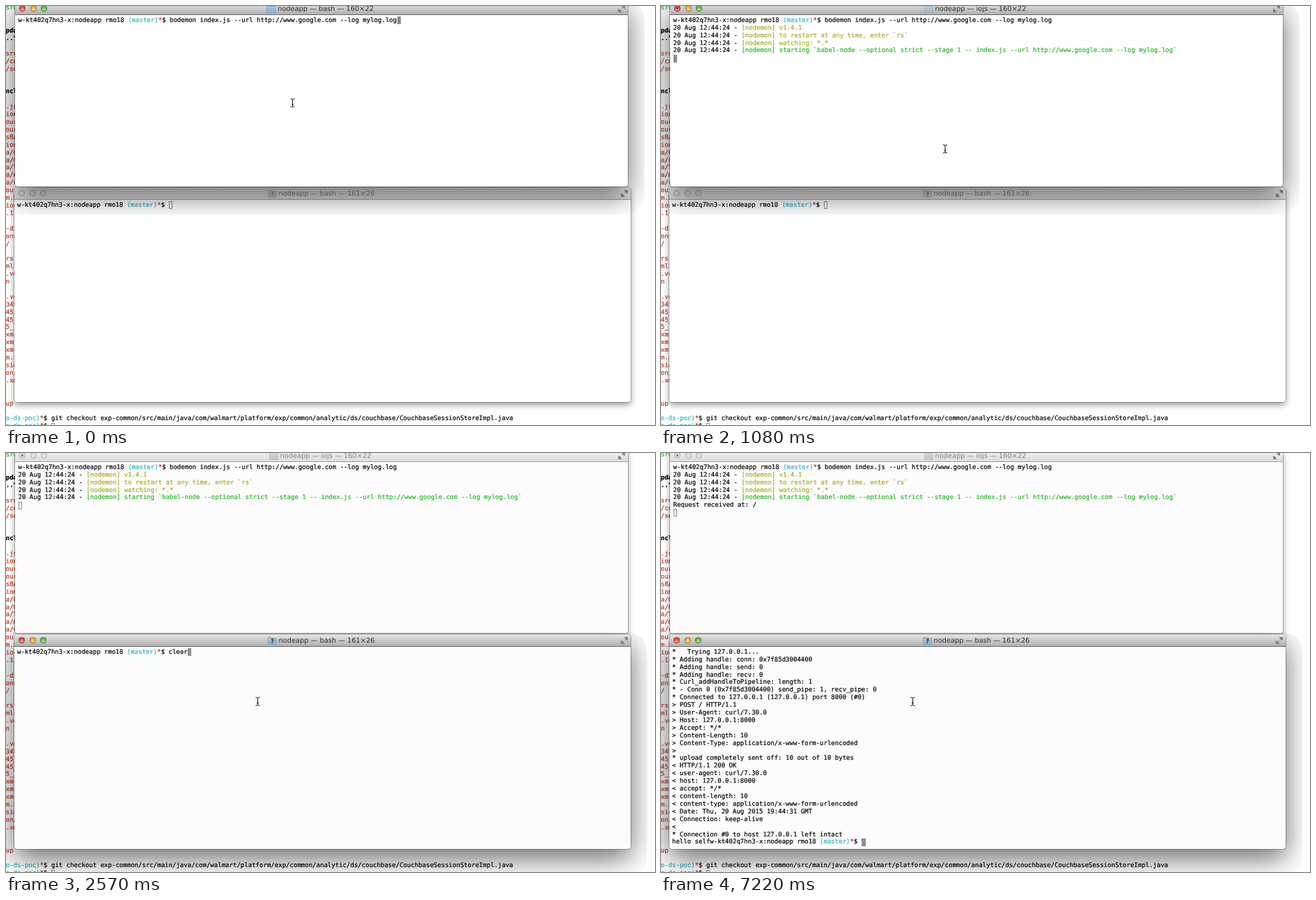
Animation of 932x601 px, one loop 8000 ms. Source, as an HTML page:

```html
<!DOCTYPE html>
<html lang="en">
<head>
<meta charset="utf-8">
<title>Two terminals</title>
<style>
  html, body { margin: 0; width: 100%; height: 100%; overflow: hidden; background: #fff; }
  #stage { position: absolute; width: 932px; height: 601px; overflow: hidden; text-rendering: geometricPrecision; }
  #stage > *, .bar, .lights i, .screen, .cursor, .expand { position: absolute; }
  pre {
    margin: 0; color: #000; white-space: pre;
    font: 9.04px/10.91px "DejaVu Sans Mono", monospace;
    -webkit-text-stroke: .2px currentColor;
  }
  pre b { font-weight: 400; }
  pre strong { font-weight: 700; }
  .red { color: #c23621; } .green { color: #25b824; } .yellow { color: #a9a927; } .cyan { color: #2fb4c2; }

  .win { background: #fff; border-radius: 4px; box-shadow: 0 0 0 .6px rgba(0,0,0,.35), 0 4px 10px rgba(0,0,0,.42); }
  /* The wide shadow ends in a crisp edge instead of fading out. */
  .win.active {
    z-index: 1; box-shadow: 0 0 0 .6px rgba(0,0,0,.45), 0 13px 40px rgba(0,0,0,.6);
    clip-path: inset(-3px -24px -40px -24px round 28px);
  }
  .tinted .win { background: #fcfcfc; }
  #top { left: 13px; top: -5px; width: 880px; height: 264px; }
  #bottom { left: 12px; top: 260px; width: 885px; height: 308px; }
  .bar {
    left: 0; top: 0; width: 100%; height: 18px; box-sizing: border-box;
    border-radius: 4px 4px 0 0; border-bottom: 1px solid #a0a0a0;
    background: linear-gradient(#f4f4f4, #dcdcdc); color: #808080;
  }
  .active .bar { background: linear-gradient(#e6e6e6, #b0b0b0); border-color: #6a6a6a; color: #2c2c2c; }
  .title {
    position: relative; left: -2px; top: .8px; height: 17px; display: flex; justify-content: center; align-items: center;
    gap: 3px; font: 9.8px/17px "DejaVu Sans", sans-serif; white-space: pre;
  }
  .title svg { opacity: .5; filter: grayscale(.5); }
  .active .title svg { opacity: 1; filter: none; }
  .busy .title svg { opacity: .55; }
  .lights i {
    top: 4px; width: 9px; height: 9px; box-sizing: border-box; border-radius: 50%;
    border: 1px solid #a4a4a4; background: #e2e2e2;
  }
  .active .lights i { border-color: rgba(0,0,0,.4); background: radial-gradient(circle at 50% 75%, #fff9, #fff0 60%) var(--c); }
  .busy .lights i:first-child::after {
    content: ""; position: absolute; left: 2px; top: 2px; width: 3px; height: 3px; border-radius: 50%; background: #0008;
  }
  .expand { right: 4px; top: 4px; fill: #777; stroke: #777; }
  .screen { top: 20.8px; }
  .cursor { width: 5.4px; height: 11px; margin-top: -.8px; box-sizing: border-box; border: 1px solid #8c8c8c; }
  .active .cursor { background: #8c8c8c; }
  #mouse { left: 0; top: 0; z-index: 2; }
</style>
</head>
<body>
<div id="stage"></div>
<script>
const CELL = 5.443, ROW = 10.91, LOOP = 8000;
const stage = document.getElementById('stage');
const esc = s => s.replace(/&/g, '&amp;').replace(/</g, '&lt;').replace(/>/g, '&gt;');
const paint = (color, s) => `<b class="${color}">${esc(s)}</b>`;
const cursorAt = (col, row) => `<div class="cursor" style="left:${col * CELL}px;top:${row * ROW}px"></div>`;

const HOST = 'w-kt402q7hn3-x:nodeapp rmo18 ';
const PROMPT = HOST + paint('cyan', '(master)') + paint('red', '*') + '$ ';
const PROMPT_COLS = 40;

// Terminal behind the two windows; only its left edge and last lines show.
const edge = ['src', '', '', 'pda', '.."', '', 'src', '/co', '/se', '', '', 'ncl', '',
  '.js', 'ion', 'our', 'our', 'sBa', 'ion', 'a/C', 'a/C', 'a/T', 'a/m', 'a/v', 'our', 'm.x', 'ion', '.11', '',
  '-di', 'ons', '/', '', 'rs', 'ml', '.ve', 'n', '', '.ve', '345', '45_', '45_', '5_', 'xm', 'xm', 'xm',
  'm.x', 'sio', 'on/', '.xm', '', '', 'up', ''];
const edgeLine = (s, i) => i === 0 ? paint('green', s)
  : [3, 4, 11].includes(i) ? `<strong>${s}</strong>` : paint('red', s);
const poc = paint('cyan', 'o-ds-poc)') + paint('red', '*') + '$ ';
const backdrop = [...edge.map(edgeLine),
  poc + 'git checkout exp-common/src/main/java/com/walmart/platform/exp/common/analytic/ds/couchbase/CouchbaseSessionStoreImpl.java',
  poc].join('\n') + cursorAt(12, 55);

// Text of the upper window.
const stamp = '20 Aug 12:44:24 - ';
const command = 'bodemon index.js --url http://www.google.com --log mylog.log';
const launch = PROMPT + command;
const log = [launch,
  ...['v1.4.1', 'to restart at any time, enter `rs`', 'watching: *.*'].map(s => stamp + paint('yellow', '[nodemon] ' + s)),
  stamp + paint('green', '[nodemon] starting `babel-node --optional strict --stage 1 -- index.js --url http://www.google.com --log mylog.log`')
].join('\n');

// Text of the lower window.
const typed = s => PROMPT + esc(s) + cursorAt(PROMPT_COLS + s.length, 0);
const response = esc(`*   Trying 127.0.0.1...
* Adding handle: conn: 0x7f85d3004400
* Adding handle: send: 0
* Adding handle: recv: 0
* Curl_addHandleToPipeline: length: 1
* - Conn 0 (0x7f85d3004400) send_pipe: 1, recv_pipe: 0
* Connected to 127.0.0.1 (127.0.0.1) port 8000 (#0)
> POST / HTTP/1.1
> User-Agent: curl/7.30.0
> Host: 127.0.0.1:8000
> Accept: */*
> Content-Length: 10
> Content-Type: application/x-www-form-urlencoded
>
* upload completely sent off: 10 out of 10 bytes
< HTTP/1.1 200 OK
< user-agent: curl/7.30.0
< host: 127.0.0.1:8000
< accept: */*
< content-length: 10
< content-type: application/x-www-form-urlencoded
< Date: Thu, 20 Aug 2015 19:44:31 GMT
< Connection: keep-alive
<
* Connection #0 to host 127.0.0.1 left intact
hello self`) + PROMPT + cursorAt(PROMPT_COLS + 10, 25);

const folder = mark => `<svg width="13" height="11" viewBox="0 0 13 11">
  <path d="M.5 2.5V1.2Q.5.5 1.2.5H4.5L5.5 1.6H11.8Q12.5 1.6 12.5 2.3V9.8Q12.5 10.5 11.8 10.5H1.2Q.5 10.5.5 9.8Z" fill="#8fbad8" stroke="#6f9cbd" stroke-width=".7"/>
  <path d="M.8 3.2H12.2" stroke="#c3dcec"/>
  ${mark ? '<text x="6.5" y="9.4" text-anchor="middle" font-family="DejaVu Sans, sans-serif" font-weight="700" font-size="9" fill="#26333e">?</text>' : ''}</svg>`;
const lights = [['#e8493c', 6], ['#f3b02f', 21.6], ['#62b946', 37.2]]
  .map(([c, x]) => `<i style="--c:${c};left:${x}px"></i>`).join('');
const windowHtml = (id, pad, mark) => `<div id="${id}" class="win">
  <div class="bar"><div class="lights">${lights}</div>
    <div class="title">${folder(mark)}<span></span></div>
    <svg class="expand" width="10" height="10" viewBox="0 0 10 10"><path d="M5 .5H9.5V5ZM.5 5V9.5H5ZM7.5 2.5L5.6 4.4M2.5 7.5L4.4 5.6" stroke-width=".7"/></svg>
  </div><pre class="screen" style="left:${pad}px"></pre></div>`;

stage.innerHTML = `<pre style="left:-.3px;top:-1.6px">${backdrop}</pre>
  ${windowHtml('bottom', 4, true)}${windowHtml('top', 4.5, false)}
  <svg id="mouse" width="932" height="601"><path/></svg>`;

const [topWin, bottomWin] = ['top', 'bottom'].map(id => document.getElementById(id));
const pointer = document.querySelector('#mouse path');
const shapes = {
  beam: ['M-3-6Q0-6 0-4V4Q0 6-3 6M3-6Q0-6 0-4M0 4Q0 6 3 6M-1.5 2H1.5', 'none', '#111', 1],
  arrow: ['M0 0V11L2.6 8.7 4.4 12.8 6.3 12 4.5 8H8Z', '#000', '#fff', .8]
};

// Each step changes some of the state and holds until the next one.
const steps = [
  [0, { shell: 'bash', focus: 'top', upper: launch + cursorAt(100, 0), lower: typed(''), mouse: ['beam', 411.5, 139] }],
  [450, { upper: launch + cursorAt(0, 1) }],
  [630, { shell: 'sh', upper: log + cursorAt(0, 5) }],
  [780, { shell: 'iojs' }],
  [1080, { mouse: ['beam', 408, 205] }],
  [1230, { mouse: ['beam', 404.5, 223] }],
  [1380, { mouse: ['arrow', 368, 327.5] }],
  [1530, { mouse: ['arrow', 361, 355] }],
  [1820, { focus: 'bottom', mouse: ['beam', 361.5, 356.5] }],
  [2570, { lower: typed('clear') }],
  [3020, { lower: typed('rm mylog.log') }],
  [3320, { lower: typed('ls') }],
  [3620, { lower: typed('curl -v -X POST http://127.0.0.1:8000 -d "hello self"') }],
  [7220, { upper: log + '\nRequest received at: /' + cursorAt(0, 6), lower: response }]
];
const states = [];
steps.forEach(([, change], i) => states.push({ ...states[i - 1], ...change }));

function show({ shell, focus, upper, lower, mouse: [kind, x, y] }) {
  topWin.classList.toggle('active', focus === 'top');
  topWin.classList.toggle('busy', shell !== 'bash');
  bottomWin.classList.toggle('active', focus === 'bottom');
  stage.classList.toggle('tinted', focus === 'bottom');
  topWin.querySelector('span').textContent = `nodeapp — ${shell} — 160×22`;
  bottomWin.querySelector('span').textContent = 'nodeapp — bash — 161×26';
  topWin.querySelector('.screen').innerHTML = upper;
  bottomWin.querySelector('.screen').innerHTML = lower;
  const [d, fill, stroke, width] = shapes[kind];
  const attrs = { d, fill, stroke, 'stroke-width': width, transform: `translate(${x} ${y})` };
  for (const name in attrs) pointer.setAttribute(name, attrs[name]);
}

const start = performance.now();
let shown = -1;
function tick() {
  const t = (performance.now() - start) % LOOP;
  const index = steps.filter(([at]) => at <= t).length - 1;
  if (index !== shown) show(states[shown = index]);
  requestAnimationFrame(tick);
}
tick();
</script>
</body>
</html>
```
